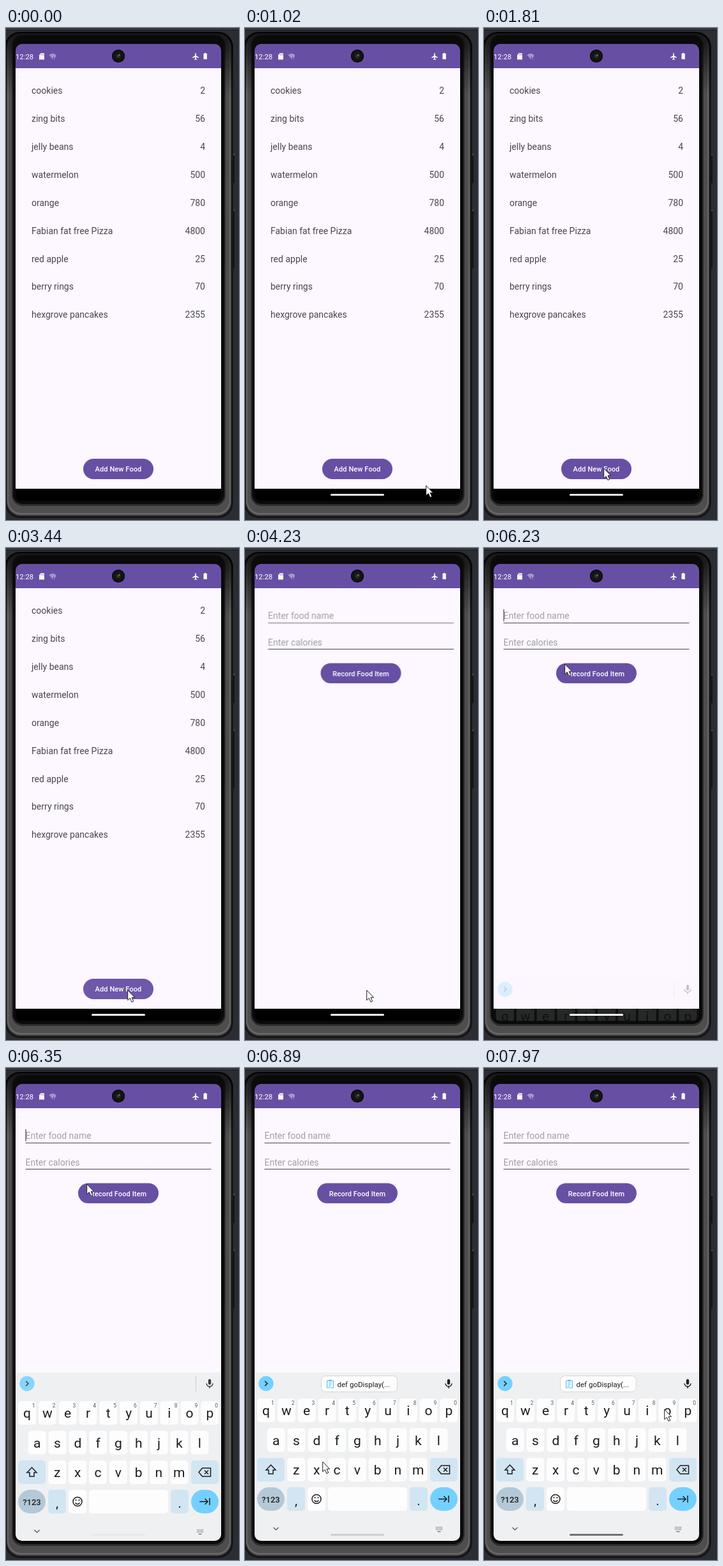
Animation, 365 px wide and 771 px high, one loop 8 s. Source, as an HTML page:

```html
<!DOCTYPE html>
<html lang="en">
<head>
<meta charset="utf-8">
<title>Food list</title>
<style>
html, body { margin: 0; width: 100%; height: 100%; overflow: hidden; background: #2b2d33; }
svg { display: block; width: 100vw; height: 100vh; }
text { font-family: Roboto, sans-serif; font-size: 14px; fill: #49454f; }
.end { text-anchor: end; }
.mid { text-anchor: middle; }
.label { font-size: 11px; font-weight: 500; fill: #fff; text-anchor: middle; letter-spacing: .08px; }
.hint { fill: #a29da6; }
.letter { font-size: 21px; fill: #1c1d1f; text-anchor: middle; }
.sup { font-size: 8.5px; fill: #55585c; text-anchor: middle; }
.ink { fill: none; stroke: #1c1d1f; stroke-width: 1.5; }

#list, #add, #form, #focus, #caret, #kb, #kbBg, #keys, #strip, #chip, #rule, #bar, #cursor {
  animation: 8s step-end infinite;
}
#list { animation-name: list; }
#add { animation-name: hover; }
#form { animation-name: form; }
#focus { animation-name: focus; }
#caret { animation-name: caret; }
#kb { animation-name: slide; }
#kbBg { animation-name: fadeBg; }
#keys { animation-name: fadeKeys; }
#strip { animation-name: fadeStrip; }
#chip { animation-name: chip; }
#rule { animation-name: rule; }
#bar { animation-name: bar; }
#cursor { animation-name: cursor; }

@keyframes list { 0% { opacity: 1 } 51.375% { opacity: .4 } 52.875%, 100% { opacity: 0 } }
@keyframes hover { 0% { fill: #6750a4 } 37.75%, 100% { fill: #6d58aa } }
@keyframes form {
  0% { opacity: 0; transform: translate(5.5px, 0) }
  51.375% { opacity: .5; transform: translate(5.5px, 0) }
  52.875% { opacity: 1; transform: translate(5.5px, 0) }
  54.375% { opacity: 1; transform: translate(.8px, 0) }
  56.25%, 100% { opacity: 1; transform: none }
}
@keyframes focus {
  0% { stroke: #b4b0b6; stroke-width: 2px }
  71.125%, 100% { stroke: #4b4850; stroke-width: 1px }
}
@keyframes caret {
  0% { opacity: 0 } 74.375% { opacity: 1 } 81.25% { opacity: 0 } 88% { opacity: 1 } 92.5%, 100% { opacity: 0 }
}
@keyframes slide {
  0% { opacity: 0; transform: translate(0, 197px) }
  77.875% { opacity: 1; transform: translate(0, 197px) }
  79.375%, 100% { opacity: 1; transform: none }
}
@keyframes fadeBg { 0% { opacity: .06 } 79.375%, 100% { opacity: 1 } }
@keyframes fadeKeys {
  0% { opacity: .1; transform: none }
  79.375% { opacity: 1; transform: translate(0, 4px) }
  81.25% { opacity: 1; transform: translate(0, 1px) }
  82.75%, 100% { opacity: 1; transform: none }
}
@keyframes fadeStrip { 0% { opacity: .24 } 79.375% { opacity: .85 } 81.25%, 100% { opacity: 1 } }
@keyframes chip { 0% { opacity: 0 } 81.25% { opacity: .5 } 82.75%, 100% { opacity: 1 } }
@keyframes rule { 0% { opacity: 1 } 81.25%, 100% { opacity: 0 } }
@keyframes bar {
  0% { fill: #0000 } 1.5% { fill: #4a4a4a } 3% { fill: #999 } 4.5% { fill: #d5d5d5 } 6.375% { fill: #e4e4e4 }
  35.875% { fill: #f4f4f4 } 77.875% { fill: #fff } 79.375% { fill: #e8e8e8 } 84.625% { fill: #dcdcdd }
  86.125% { fill: #cfcfd0 } 88% { fill: #aaa } 89.5% { fill: #8a8a8a } 92.5%, 100% { fill: #727273 }
}
@keyframes cursor {
  0% { transform: translate(-50px, 0) }
  4.5% { transform: translate(282px, 762px) }
  6.375% { transform: translate(284px, 760px) }
  7.875% { transform: translate(285px, 753px) }
  9.375% { transform: translate(285px, 744px) }
  10.875% { transform: translate(284px, 736px) }
  12.75% { transform: translate(283px, 716px) }
  14.375% { transform: translate(275px, 700px) }
  16.25% { transform: translate(250px, 686px) }
  17.75% { transform: translate(214px, 677px) }
  19.25% { transform: translate(195px, 682px) }
  20.75% { transform: translate(188px, 689px) }
  22.625% { transform: translate(187px, 689px) }
  35.875% { transform: translate(187px, 690px) }
  41.125% { transform: translate(188px, 691px) }
  43% { transform: translate(190px, 692px) }
  56.25% { transform: translate(190px, 690px) }
  57.75% { transform: translate(188px, 678px) }
  59.25% { transform: translate(179px, 638px) }
  60.75% { transform: translate(162px, 560px) }
  62.25% { transform: translate(140px, 469px) }
  64.125% { transform: translate(122px, 335px) }
  65.625% { transform: translate(107px, 217px) }
  67.5% { transform: translate(95px, 138px) }
  69.25% { transform: translate(85px, 106px) }
  77.875% { transform: translate(126px, 181px) }
  81.25% { transform: translate(130px, 330px) }
  82.75% { transform: translate(130px, 484px) }
  84.625% { transform: translate(125px, 565px) }
  86.125% { transform: translate(121px, 616px) }
  88% { transform: translate(121px, 619px) }
  92.5% { transform: translate(124px, 625px) }
  94.375% { transform: translate(155px, 573px) }
  95.875% { transform: translate(121px, 621px) }
  97.75% { transform: translate(255px, 553px) }
  99.625%, 100% { transform: translate(282px, 534px) }
}
</style>
</head>
<body>
<svg viewBox="0 0 365 771" preserveAspectRatio="none">
  <defs>
    <linearGradient id="shade" x2="0" y2="1">
      <stop offset="0" stop-opacity=".75"/><stop offset=".03" stop-opacity=".6"/><stop offset=".13" stop-opacity="0"/>
    </linearGradient>
    <radialGradient id="lens">
      <stop offset="0" stop-color="#3c4440"/><stop offset=".45" stop-color="#1b1f1d"/><stop offset="1" stop-color="#080808"/>
    </radialGradient>
    <clipPath id="screen"><rect x="15" y="25" width="322" height="716" rx="10"/></clipPath>
  </defs>

  <rect width="365" height="771" fill="#2b2d33"/>
  <rect width="365" height="3" fill="#35373d"/>
  <rect y="3" width="365" height="1" fill="#1b1c20"/>
  <g fill="#141414">
    <rect x="354" y="197" width="4" height="46" rx="1"/>
    <rect x="354" y="284" width="4" height="93" rx="1"/>
  </g>
  <path d="M357 197v3M357 284v3" stroke="#777"/>
  <!-- phone frame, outside in -->
  <rect x="-2" y="6" width="358" height="762" rx="24" fill="#161616"/>
  <rect x="1" y="8" width="352" height="757" rx="22" fill="#383838"/>
  <rect x="2" y="9" width="350" height="754" rx="21" fill="#666"/>
  <rect x="4" y="10" width="346" height="750" rx="20" fill="#4e4e4e"/>
  <rect x="9" y="11" width="335" height="738" rx="17" fill="#2c2c2c"/>
  <rect x="-2" y="6" width="358" height="762" rx="24" fill="url(#shade)"/>
  <rect x="11" y="12" width="331" height="734" rx="15" fill="#0a0a0a"/>

  <g clip-path="url(#screen)">
    <rect x="15" y="25" width="322" height="716"/>
    <rect x="15" y="63" width="322" height="659" fill="#fdf7ff"/>
    <g id="list">
      <g id="rows"></g>
      <rect id="add" x="121" y="675" width="110" height="32" rx="16"/>
      <text class="label" x="176" y="695">Add New Food</text>
    </g>
    <g id="form">
      <text class="hint" x="30.5" y="111">Enter food name</text>
      <text class="hint" x="30.5" y="152.500">Enter calories</text>
      <path id="focus" d="M30.500 117.500H321.500"/>
      <path d="M30.500 158.500H321.500" stroke="#4b4850"/>
      <rect x="113" y="180.500" width="126" height="31.500" rx="15.700" fill="#6750a4"/>
      <text class="label" x="176" y="200.500">Record Food Item</text>
      <rect id="caret" x="30.300" y="96" width="1.400" height="19" fill="#626067"/>
    </g>

    <rect x="15" y="25" width="322" height="38" fill="#6750a4"/>
    <text x="15" y="48.500" style="font-size:11.3px;fill:#fff">12:28</text>
    <path d="M54.500 39.500h5.500v10h-8v-7z" fill="#fff"/>
    <path d="M55 41v2M57 41v2M59 41v2" stroke="#6750a4" stroke-width=".7"/>
    <path d="M67.500 42.200q5.500-4.600 11 0l-1.500 2-3 0-.5 5z" fill="#fff" opacity=".4"/>
    <path d="M74.500 45q1.500-1.800 2.600-.3 0 1-1.300 2.300m0 1.400v1" fill="none" stroke="#e4dcf4" stroke-width=".9"/>
    <path d="M297 39.300q.8 0 .8 1v3l4 2.500v1.100l-4-1.200v2.500l1.200.9v.8l-2-.5-2 .5v-.8l1.200-.9v-2.500l-4 1.200v-1.100l4-2.500v-3q0-1 .8-1z" fill="#fff"/>
    <path d="M309.500 40h1.500v-1h2.300v1h1.500v9h-5.300z" fill="#fff"/>

    <g id="kb">
      <rect id="kbBg" x="15" y="477" width="322" height="270" fill="#eff0f2"/>
      <g id="strip">
        <circle cx="33" cy="494.500" r="11.700" fill="#74d0fe"/>
        <path class="ink" d="M31.200 490.700l3.800 3.800-3.800 3.800"/>
        <rect id="rule" x="297" y="483" width="1" height="24" fill="#c4c4c8"/>
        <rect x="316.800" y="487.500" width="4.400" height="8.800" rx="2.200" fill="#1c1d1f"/>
        <path class="ink" d="M314 494.300a5 4.800 0 0 0 10 0M319 499v3"/>
      </g>
      <g id="chip">
        <rect x="119.500" y="482.500" width="119" height="25" rx="7" fill="#fdfdfe" stroke="#d4d5d8"/>
        <path d="M128.700 490h9.600v11h-9.600zM131 493.500h5M131 496h5M131 498.500h3.500" fill="none" stroke="#55bdf0" stroke-width="1.100"/>
        <rect x="131.300" y="488.600" width="4.400" height="2.600" fill="#55bdf0"/>
        <text x="144.500" y="499.500" style="font-size:11.5px;fill:#1c1d1f">def goDisplay(...</text>
      </g>
      <g id="keys"></g>
    </g>
    <rect id="bar" x="134" y="730" width="84" height="3" rx="1.500"/>
  </g>

  <circle cx="176" cy="44" r="10.200" fill="#0a0a0a"/>
  <circle cx="176" cy="44" r="7.500" fill="url(#lens)" stroke="#2a2a2a" stroke-width=".8"/>
  <circle cx="177.500" cy="42.500" r="1.100" fill="#7d8a84"/>

  <path id="cursor" d="M.7 1V16.700L4.300 13.400 7 19.500 9.700 18.300 7.100 12.300H11.600Z" fill="#fff" stroke="#1c1c1c"/>
</svg>
<script>
const fill = (id, html) => { document.getElementById(id).innerHTML = html; };

const foods = [
  ['cookies', 2], ['zing bits', 56], ['jelly beans', 4], ['watermelon', 500], ['orange', 780],
  ['Fabian fat free Pizza', 4800], ['red apple', 25], ['berry rings', 70], ['hexgrove pancakes', 2355]
];
fill('rows', foods.map(([name, kcal], i) => {
  const y = 103.3 + i * 43.87;
  return `<text x="40" y="${y}">${name}</text><text class="end" x="312" y="${y}">${kcal}</text>`;
}).join(''));

const key = (x, y, w, color = '#fdfdfe', r = 5) =>
  `<rect x="${x}" y="${y}" width="${w}" height="37" rx="${r}" fill="${color}"/>`;
const letter = (c, x, y) => `<text class="letter" x="${x}" y="${y}">${c}</text>`;
const row = (chars, x0, y) => [...chars].map((c, i) => {
  const x = x0 + i * 31.82;
  return key(x - 14, y, 28) + letter(c, x, y + 26);
}).join('');

const sups = [...'1234567890'].map((c, i) =>
  `<text class="sup" x="${43.3 + i * 31.82}" y="528">${c}</text>`).join('');
const pale = '#d2e5f2';
const dots = [0, 1, 2].map(r => `<path d="M299 ${719.5 + r * 2}h10" stroke="#5f6368" stroke-width="1.200" stroke-dasharray="1.200 1"/>`).join('');

fill('keys',
  row('qwertyuiop', 33, 518) + sups +
  row('asdfghjkl', 48.7, 564.5) +
  row('zxcvbnm', 80.3, 611) +
  key(19, 611, 43, pale) + key(290, 611, 43, pale) +
  '<path class="ink" d="M40.500 622l7.500 8h-4v6h-7v-6h-4z"/>' +
  '<path class="ink" d="M302 629.500l5.500-6.500h13v13h-13zM311 626.500l6 6m0-6l-6 6"/>' +
  key(19, 657, 43, '#b3c9d7', 18.5) +
  '<text class="mid" x="40.500" y="680.500" style="font-size:13px;font-weight:500;fill:#1c1d1f">?123</text>' +
  key(66, 657, 28, pale) + letter(',', 80, 685) +
  key(98, 657, 28) +
  '<circle class="ink" cx="112" cy="675.500" r="7"/><path class="ink" d="M108.500 677.500q3.500 4 7 0M109.500 672v2.200M114.500 672v2.200"/>' +
  key(130, 657, 124) +
  key(258, 657, 28, pale) + letter('.', 272, 685) +
  key(290, 657, 43, '#74d0fe', 18.5) +
  '<path class="ink" d="M303 675.500h12.500M311.500 671l4.500 4.500-4.500 4.500M319 670v11"/>' +
  '<path d="M44.500 720l4 4 4-4" fill="none" stroke="#4d5156" stroke-width="1.200"/>' +
  dots + '<path d="M301.500 726.500h5" stroke="#5f6368" stroke-width="1.200"/>');
</script>
</body>
</html>
```
